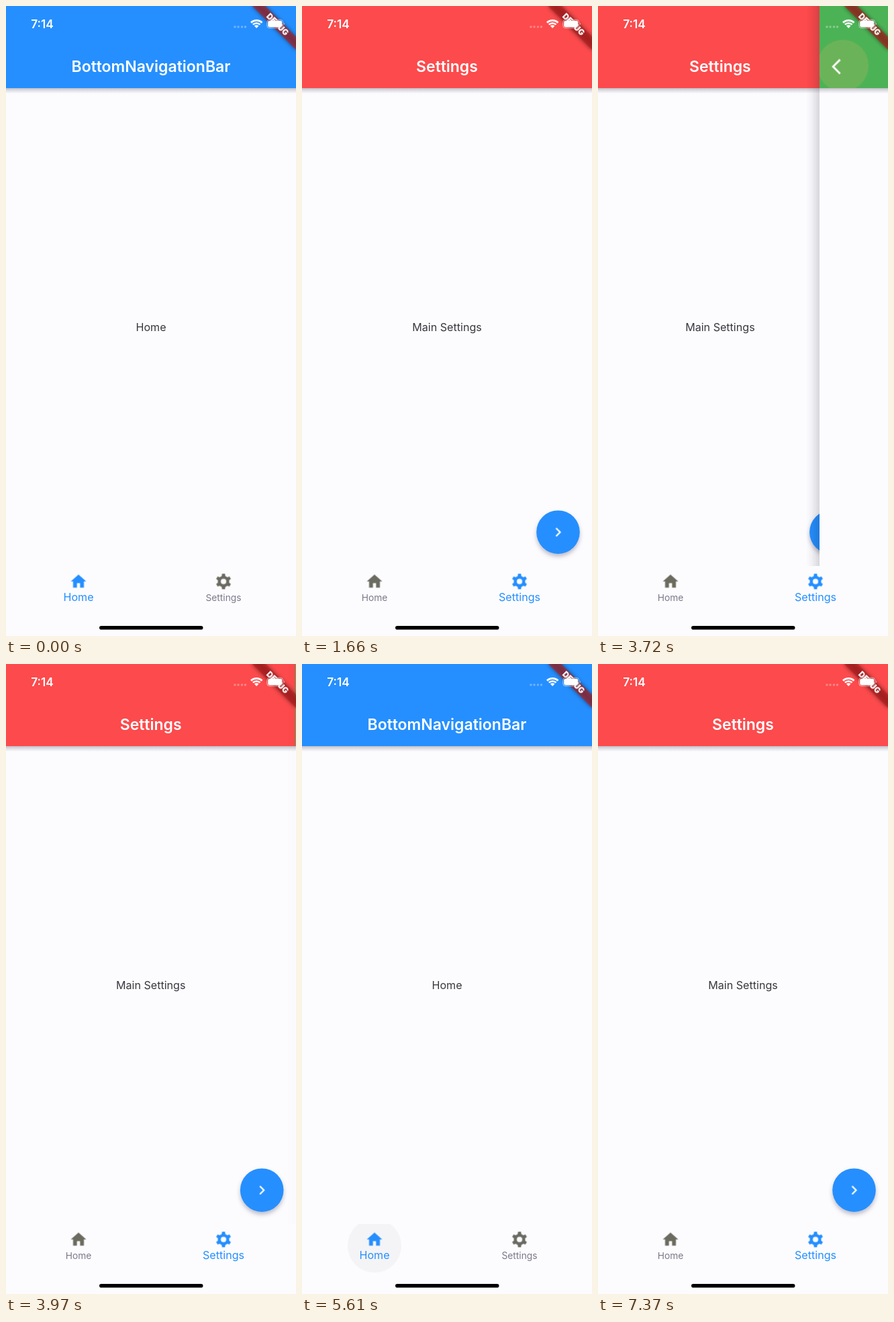
An HTML page that plays this animation: 432x936 px, repeating every 8000 ms.

```html
<!DOCTYPE html>
<html lang="en">
<head>
<meta charset="utf-8">
<title>Bottom navigation</title>
<style>
  html, body { margin: 0; width: 100%; height: 100%; overflow: hidden; background: #fcfcff; }
  svg { display: block; font-family: Inter, sans-serif; text-anchor: middle; }
  .title { font-size: 23px; font-weight: 600; fill: #fff; }
  .body { font-size: 16.1px; fill: #37373d; }
  .label { font-size: 16.1px; }
  .fab { filter: drop-shadow(0 4px 3px rgba(40, 40, 70, .3)); }
  .ribbonShade { filter: blur(3px); }
</style>
</head>
<body>
<svg id="stage" width="432" height="936" viewBox="0 0 432 936"></svg>
<script>
const LOOP = 8000;
const BLUE = '#258fff', RED = '#fd4a4c', GREEN = '#4bb356', PAPER = '#fcfcff';
const SLIDE = 'cubic-bezier(.35,.91,.33,.97)';
const STANDARD = 'cubic-bezier(.4,0,.2,1)';

const PUSH = 1770, POP = 3590, SLIDE_MS = 400;
const SWITCHES = [560, 5440, 7130];

const page = (id, color, title, text, extra = '') => `
  <g id="${id}">
    <rect width="432" height="832" fill="${PAPER}"/>
    <rect y="122" width="432" height="8" fill="url(#barShade)"/>
    <rect width="432" height="122" fill="${color}"/>
    <text class="title" x="216" y="98">${title}</text>
    <text class="body" x="216" y="483">${text}</text>
    ${extra}
  </g>`;

const fab = `
  <g transform="translate(381.5 781.7)">
    <circle class="fab" r="32.3" fill="${BLUE}"/>
    <circle id="fabInk" r="32.3" fill="#fff" fill-opacity=".2"/>
    <path d="M-3-6L3 0L-3 6" fill="none" stroke="#fff" stroke-width="2.3"/>
  </g>`;

const backButton = `
  <g clip-path="url(#barClip)"><g transform="translate(35 88.5)">
    <circle id="backInk" r="38.5" fill="#c8b464" fill-opacity=".3"/>
  </g></g>
  <path transform="translate(18.5 76.2) scale(1.152)" fill="#fff"
    d="M11.67 3.87L9.9 2.1 0 12l9.9 9.9 1.77-1.77L3.54 12z"/>`;

const edgeShade = `<rect id="edge" x="-20" width="20" height="832" fill="url(#edgeShade)"/>`;

const homeIcon = '<path transform="translate(-12 -12)" d="M10 20v-6h4v6h5v-8h3L12 3 2 12h3v8z"/>';
const tooth = angle => `<path transform="rotate(${angle})" d="M-1.9-9.9h3.8l.6 4h-5z"/>`;
const gearIcon = [0, 60, 120, 180, 240, 300].map(tooth).join('') +
  '<circle r="5.5" fill="none" stroke-width="3.9"/>';

const navItem = (id, x, label, icon) => `
  <g transform="translate(${x} 864.3)"><circle id="${id}Ink" r="40" fill="#808080" fill-opacity=".16"/></g>
  <g id="${id}Icon" stroke-width="0" transform="translate(${x} 855) scale(1.152)">${icon}</g>
  <g transform="translate(${x} 884)"><text id="${id}Label" class="label">${label}</text></g>`;

const wifiArc = r => {
  const d = r * .7;
  return `<path d="M${-d} ${-d}A${r} ${r} 0 0 1 ${d} ${-d}" fill="none" stroke="#fff" stroke-width="2.6"/>`;
};

const statusBar = `
  <g fill="#fff">
    <text x="54" y="33" font-size="17.3" font-weight="600">7:14</text>
    <g fill-opacity=".32">${[341, 346, 351.5, 356.5].map(x => `<circle cx="${x}" cy="31" r="1.8"/>`).join('')}</g>
    <g transform="translate(373.2 33)">
      ${wifiArc(11.8)}${wifiArc(7.6)}<path d="M0 0L-3.3-3.4A4.7 4.7 0 0 1 3.3-3.4z"/>
    </g>
    <rect x="388.7" y="20.3" width="24" height="12.6" rx="4" fill="none" stroke="#fff" stroke-opacity=".55"/>
    <rect x="390.2" y="21.8" width="21" height="9.6" rx="2.6"/>
    <path d="M414 24.5q2 2 0 4z" fill-opacity=".6"/>
  </g>`;

const ribbonBand = attrs => `<rect x="-46" y="32.3" width="92" height="13.8" ${attrs}/>`;
const ribbon = `
  <g transform="translate(432 0) rotate(45)">
    ${ribbonBand('class="ribbonShade" fill-opacity=".5"')}
    ${ribbonBand('fill="#b71c1c" fill-opacity=".63"')}
    <text y="43.4" font-size="11.75" font-weight="900" fill="#fff">DEBUG</text>
  </g>`;

const stop = (offset, alpha) => `<stop offset="${offset}" stop-color="#141428" stop-opacity="${alpha}"/>`;

document.getElementById('stage').innerHTML = `
  <defs>
    <linearGradient id="barShade" x2="0" y2="1">${stop(0, .26)}${stop(.35, .15)}${stop(1, 0)}</linearGradient>
    <linearGradient id="edgeShade">${stop(0, 0)}${stop(.4, .06)}${stop(1, .24)}</linearGradient>
    <clipPath id="pageClip"><rect width="432" height="832"/></clipPath>
    <clipPath id="barClip"><rect width="432" height="122"/></clipPath>
    <clipPath id="navClip"><rect y="832" width="432" height="104"/></clipPath>
  </defs>
  <rect width="432" height="936" fill="${PAPER}"/>
  <g clip-path="url(#pageClip)">
    ${page('settings', RED, 'Settings', 'Main Settings', fab)}
    ${page('detail', GREEN, 'Detail', 'Detail Settings', backButton + edgeShade)}
    ${page('home', BLUE, 'BottomNavigationBar', 'Home')}
  </g>
  <g clip-path="url(#navClip)">
    ${navItem('homeTab', 108, 'Home', homeIcon)}
    ${navItem('settingsTab', 324, 'Settings', gearIcon)}
  </g>
  <rect x="139" y="921" width="154.5" height="5.6" rx="2.8"/>
  ${ribbon}${statusBar}`;

// Each step is [ms, value, easing towards the next step].
function loop(id, prop, steps) {
  const first = [0, steps[0][1]], last = [LOOP, steps[steps.length - 1][1]];
  const frames = [first, ...steps, last].map(([ms, value, easing = 'linear']) =>
    ({ offset: ms / LOOP, [prop]: value, easing }));
  document.getElementById(id).animate(frames, { duration: LOOP, iterations: Infinity });
}

// Alternates between two values at every tab switch.
function toggle(id, prop, before, after, ms = 200) {
  loop(id, prop, SWITCHES.flatMap((t, i) => {
    const [from, to] = i % 2 ? [after, before] : [before, after];
    return [[t, from, STANDARD], [t + ms, to]];
  }));
}

// Each tap is [press, release, end].
function ink(id, ...taps) {
  loop(id, 'opacity', taps.flatMap(([press, release, end]) =>
    [[press, 0], [release, 1], [end - 110, .8], [end, 0]]));
  loop(id, 'transform', taps.flatMap(([press, release, end]) =>
    [[press, 'scale(.1)'], [release + 60, 'scale(1)'], [end, 'scale(1)'], [end, 'scale(.1)']]));
}

function slide(id, prop, below, above, easing) {
  loop(id, prop, [
    [PUSH, below, easing], [PUSH + SLIDE_MS, above],
    [POP, above, easing], [POP + SLIDE_MS, below]
  ]);
}

function tab(id, selected) {
  const pick = (on, off) => selected ? [on, off] : [off, on];
  toggle(id + 'Icon', 'fill', ...pick(BLUE, '#6b6b60'));
  toggle(id + 'Icon', 'stroke', ...pick(BLUE, '#6b6b60'));
  toggle(id + 'Label', 'fill', ...pick(BLUE, '#7d7988'));
  toggle(id + 'Label', 'transform', ...pick('scale(1)', 'scale(.857)'));
}

toggle('home', 'opacity', 1, 0, 0);
slide('settings', 'transform', 'translateX(0px)', 'translateX(-144px)', SLIDE);
slide('detail', 'transform', 'translateX(432px)', 'translateX(0px)', SLIDE);
slide('edge', 'opacity', 0, 1);
tab('homeTab', true);
tab('settingsTab', false);
ink('settingsTabInk', [500, 560, 750], [6890, 7130, 7370]);
ink('homeTabInk', [5300, 5440, 5670]);
ink('fabInk', [1660, PUSH, 2000]);
ink('backInk', [3480, 3620, 3900]);
</script>
</body>
</html>
```
